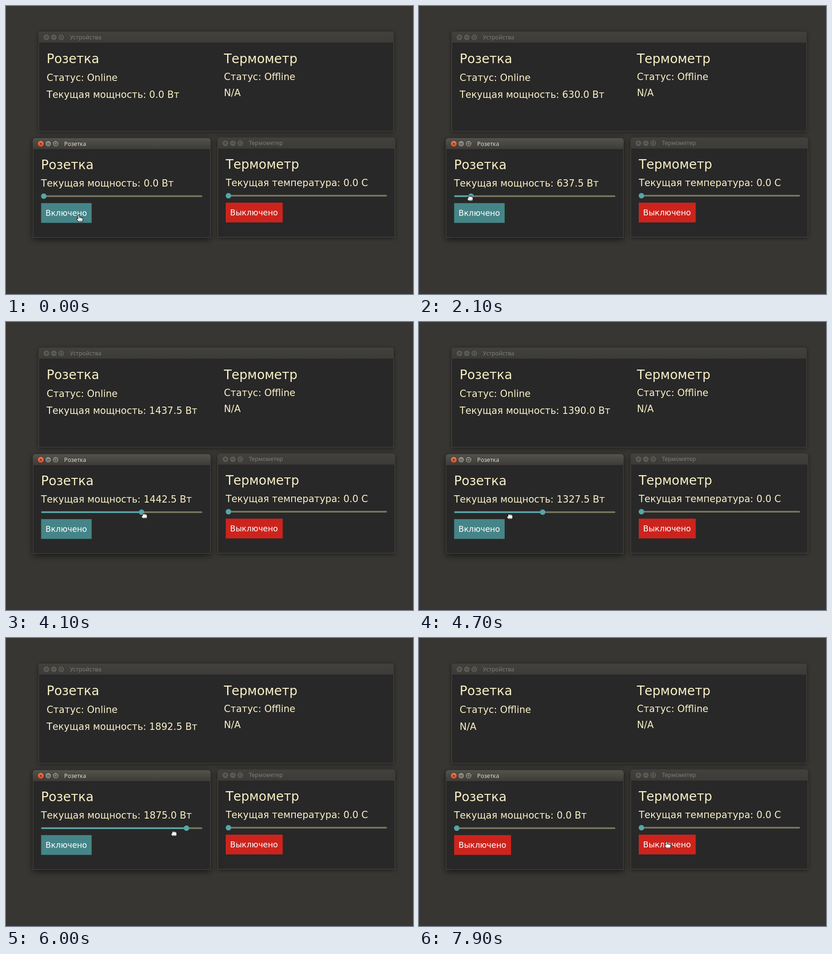
Animation, 889 px wide and 630 px high, one loop 8000 ms. Source, as an HTML page with a canvas:

```html
<!DOCTYPE html>
<html lang="ru">
<head>
<meta charset="utf-8">
<style>
html, body { margin: 0; width: 100%; height: 100%; overflow: hidden; background: #383632; }
canvas { display: block; }
</style>
</head>
<body>
<canvas id="stage" width="889" height="630"></canvas>
<script>
const ctx = document.getElementById('stage').getContext('2d');
const LOOP = 8000, TICK = 100;
const AT_KNOB = 800, DRAG_START = 1700, DRAG_END = 6300, SWITCH_OFF = 7000;
const REPORT_LAG = 47, KNOB_LAG = 200;
const CREAM = '#fbf1c7', TEAL = '#458588', RED = '#cc241d', ACCENT = '#55a6a9';

// Where the slider pauses or turns: [time, watts]
const power = [
  [1800, 510], [2100, 637.5], [2400, 622.5], [2700, 622.5], [3100, 957.5],
  [3340, 957.5], [3550, 1145], [4100, 1442.5], [4500, 1490], [5150, 775],
  [5780, 1905], [5875, 1905], [6525, 1600]
];

// Free moves of the hand before and after the drag: [time, x, y]
const approach = [[200, 161, 464], [AT_KNOB, 84, 420]];
const leave = [
  [DRAG_END, 332, 428], [6800, 141, 467], [7200, 141, 467],
  [7600, 97, 432], [7800, 85, 419], [7900, 543, 452]
];

const pointHand = new Path2D('M-3.8 -6 q1.5 -2 3 0 V-2.4 l5.6 1.2 q2.2 .6 2.2 2.4 V4 l-1.4 4 H-2.4 L-7 2.2 q-.2 -2 1.7 -1.6 l1.5 1.2 Z');
const pointLines = new Path2D('M-.8 -2 V1 M2 -1.4 V1.2 M4.6 -.8 V1.4 M-2 6 H5');
const grabHand = new Path2D('M-3.8 -3.5 q1.5 -2 3 -.5 q1.5 -1.2 2.8 0 q1.6 -.6 2.6 .8 q1.8 .2 1.8 2 V3 l-1 3 H-3.2 L-6 2.2 q-.4 -2.2 2.2 -2 Z');
const grabLines = new Path2D('M-.8 -3.4 V-1.4 M2 -3.2 V-1.2 M4.5 -2.6 V-1 M-2.4 4.2 H4.6');

const ease = p => p * p * (3 - 2 * p);

function glide(keys, t) {
  const next = keys.findIndex(k => k[0] >= t);
  if (next === 0) return keys[0].slice(1);
  if (next < 0) return keys[keys.length - 1].slice(1);
  const a = keys[next - 1], b = keys[next];
  const p = ease((t - a[0]) / (b[0] - a[0]));
  return a.slice(1).map((v, i) => v + (b[i + 1] - v) * p);
}

const watts = t => Math.round(glide(power, t)[0] / 2.5) * 2.5;
const knobOffset = w => 5.7 + Math.max(0, w - 500) * 0.2267;
const powerLabel = w => `Текущая мощность: ${w.toFixed(1)} Вт`;

// The hand leads the knob while it drags.
function handAt(t) {
  if (t < AT_KNOB) return glide(approach, t);
  if (t >= DRAG_END) return glide(leave, t);
  const progress = Math.max(0, t - DRAG_START) / (DRAG_END - DRAG_START);
  return [76.8 + knobOffset(watts(t + KNOB_LAG)), 419.5 + 8.5 * progress];
}

function text(str, x, y, size = 20.67, color = CREAM, family = '"DejaVu Sans", sans-serif') {
  ctx.font = `${size}px ${family}`;
  ctx.fillStyle = color;
  ctx.fillText(str, x, y);
}
const heading = (str, x, y) => text(str, x, y, 27.6);

function disc(x, y, r, fill) {
  ctx.beginPath();
  ctx.arc(x, y, r, 0, Math.PI * 2);
  ctx.fillStyle = fill;
  ctx.fill();
}

function vertical(y0, y1, top, bottom) {
  const g = ctx.createLinearGradient(0, y0, 0, y1);
  g.addColorStop(0, top);
  g.addColorStop(1, bottom);
  return g;
}

function windowButton(x, y, kind, active) {
  const close = kind === 0;
  disc(x, y, 7.2, active ? '#302f2b' : '#383733');
  const fill = !active ? '#5b5a55'
    : close ? vertical(y - 7, y + 7, '#f3845f', '#dc4a1e')
    : vertical(y - 7, y + 7, '#97958c', '#6f6d65');
  disc(x, y, 6.4, fill);
  ctx.strokeStyle = active ? (close ? '#5c2411' : '#34332f') : '#393834';
  ctx.lineWidth = 1.1;
  ctx.beginPath();
  if (close) {
    ctx.moveTo(x - 2.3, y - 2.3); ctx.lineTo(x + 2.3, y + 2.3);
    ctx.moveTo(x + 2.3, y - 2.3); ctx.lineTo(x - 2.3, y + 2.3);
  } else if (kind === 1) {
    ctx.moveTo(x - 3, y); ctx.lineTo(x + 3, y);
  } else {
    ctx.rect(x - 2.6, y - 2.6, 5.2, 5.2);
  }
  ctx.stroke();
}

function frameWindow(x, y, w, h, title, active) {
  const bar = 24;
  ctx.save();
  ctx.shadowColor = active ? 'rgba(0,0,0,.6)' : 'rgba(0,0,0,.45)';
  ctx.shadowBlur = active ? 14 : 10;
  ctx.shadowOffsetY = active ? 4 : 2;
  ctx.beginPath();
  ctx.roundRect(x, y, w, h, [6, 6, 0, 0]);
  ctx.fillStyle = '#4a4945';
  ctx.fill();
  ctx.restore();

  ctx.beginPath();
  ctx.roundRect(x, y, w, bar, [6, 6, 0, 0]);
  ctx.fillStyle = active ? vertical(y, y + bar, '#53524b', '#3d3c38')
                         : vertical(y, y + bar, '#42413d', '#3c3b37');
  ctx.fill();
  ctx.fillStyle = '#282828';
  ctx.fillRect(x + 1, y + bar, w - 2, h - bar - 1);

  for (let i = 0; i < 3; i++) windowButton(x + 17.3 + i * 16.2, y + 12.4, i, active);
  text(title, x + 68.4, y + 16.5, 12.5, active ? '#dfdbd2' : '#807d78', '"Noto Sans", sans-serif');
}

function groove(from, to, y, color) {
  ctx.strokeStyle = color;
  ctx.lineWidth = 3.5;
  ctx.lineCap = 'round';
  ctx.beginPath();
  ctx.moveTo(from, y);
  ctx.lineTo(to, y);
  ctx.stroke();
  ctx.lineCap = 'butt';
}

function slider(x, y, w) {
  const knob = x + knobOffset(w);
  groove(x + 1.8, x + 350.3, y, '#7c7a61');
  groove(x + 1.8, knob, y, ACCENT);
  disc(knob, y, 6, ACCENT);
}

function toggle(x, y, on) {
  ctx.fillStyle = on ? TEAL : RED;
  ctx.fillRect(x, y, on ? 110.4 : 124.4, 43.2);
  text(on ? 'Включено' : 'Выключено', x + 9.6, y + 27.6, 17.3, '#fff');
}

function hand([x, y], grabbing) {
  ctx.save();
  ctx.translate(x, y);
  ctx.lineJoin = 'round';
  ctx.fillStyle = '#fff';
  ctx.strokeStyle = '#1c1c1c';
  ctx.lineWidth = 1.2;
  ctx.fill(grabbing ? grabHand : pointHand);
  ctx.stroke(grabbing ? grabHand : pointHand);
  ctx.lineWidth = 0.7;
  ctx.stroke(grabbing ? grabLines : pointLines);
  ctx.restore();
}

function draw(t) {
  const on = t < SWITCH_OFF;
  const powered = on && t >= DRAG_START;
  const current = powered ? watts(t) : 0;
  const reported = powered ? watts(t - REPORT_LAG) : 0;

  ctx.fillStyle = '#383632';
  ctx.fillRect(0, 0, 889, 630);

  frameWindow(71, 56, 776, 218.5, 'Устройства', false);
  heading('Розетка', 88.8, 124.8);
  text(on ? 'Статус: Online' : 'Статус: Offline', 88.8, 164.4);
  text(on ? powerLabel(reported) : 'N/A', 88.8, 201);
  heading('Термометр', 476, 124.8);
  text('Статус: Offline', 476, 162.3);
  text('N/A', 476, 197.3);

  frameWindow(462, 287.7, 388, 218.5, 'Термометер', false);
  heading('Термометр', 479.9, 355.8);
  text('Текущая температура: 0.0 C', 479.9, 393.6);
  slider(480.2, 415, 0);
  toggle(480, 430.2, false);

  frameWindow(58.7, 289, 388.3, 218, 'Розетка', true);
  heading('Розетка', 76.5, 356.8);
  text(powerLabel(current), 76.6, 394.8);
  slider(76.8, 416, current);
  toggle(76.7, 431.2, on);

  hand(handAt(t), t >= DRAG_START && t <= DRAG_END);
}

function loop() {
  const t = performance.now() % LOOP;
  draw(Math.floor(t / TICK) * TICK);
  requestAnimationFrame(loop);
}
loop();
</script>
</body>
</html>
```
